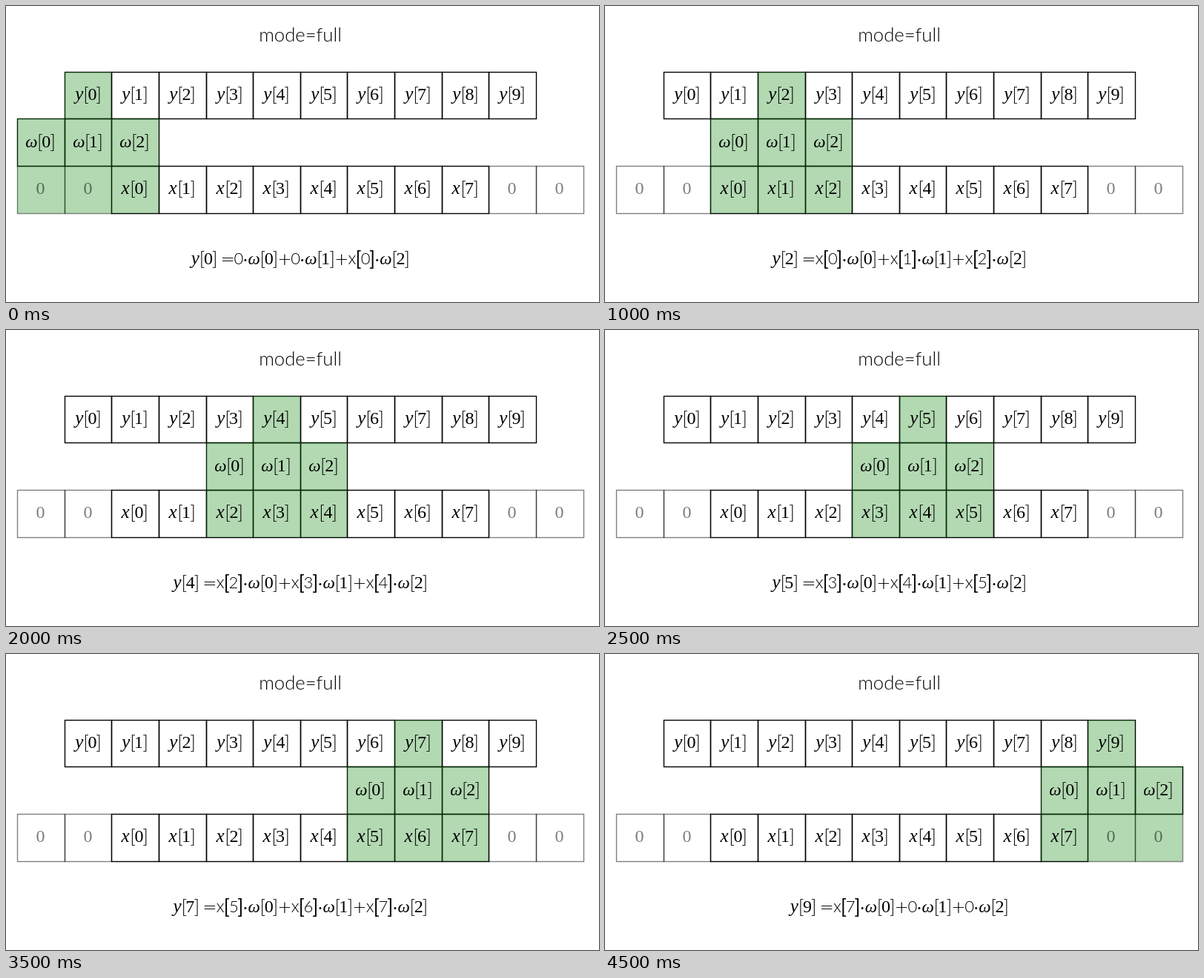
These frames come from a looping animation (800 px wide and 400 px high, 5000 ms). An HTML page with a canvas:

```html
<!DOCTYPE html>
<html lang="en">
<head>
<meta charset="utf-8">
<title>Convolution, mode=full</title>
<style>
  html, body { margin: 0; width: 100%; height: 100%; overflow: hidden; background: #fff; }
  canvas { display: block; width: 800px; height: 400px; }
</style>
</head>
<body>
<canvas id="stage" width="800" height="400"></canvas>
<script>
const ctx = document.getElementById('stage').getContext('2d');
const STEP_MS = 500, STEPS = 10, TAPS = 3, INPUTS = 8;
const ROWS = [89.5, 152.5, 216.5, 280.5];
const BASE = [127, 191, 254];
const TINT = 'rgba(0,128,0,0.3)';
const SERIF = '"Liberation Serif", serif';
const SANS = 'Lato, sans-serif';

// adv: advance, at: place of the ink centre within it, mid: centre on the math axis
const STYLES = {
  y: { font: `italic 25px ${SERIF}`, adv: 13.5 },
  x: { font: `italic 25px ${SERIF}`, adv: 14.3 },
  w: { font: `italic 23px ${SERIF}`, adv: 16.5 },
  digit: { font: `24px ${SERIF}`, adv: 11.5 },
  open: { font: `300 26px ${SANS}`, adv: 6.2, at: 0.67, mid: true },
  close: { font: `300 26px ${SANS}`, adv: 6.2, at: 0.33, mid: true },
  op: { font: '200 23px "DejaVu Sans", sans-serif', adv: 18, mid: true },
  dot: { font: `25px ${SERIF}`, adv: 7.1, mid: true },
  gap: { font: `24px ${SERIF}`, adv: 5 },
  sansX: { font: `300 23px ${SANS}`, adv: 11.2 },
  sansDigit: { font: `300 22px ${SANS}`, adv: 11.3 },
  sansOpen: { font: `26px ${SANS}`, adv: 6.5, at: 0.6, mid: true },
  sansClose: { font: `26px ${SANS}`, adv: 6.5, at: 0.4, mid: true }
};

const edge = i => 15.5 + Math.round(63.64 * i);
const index = i => [['open', '['], ['digit', i], ['close', ']']];
const symbol = (kind, ch, i) => [[kind, ch], ...index(i)];
const omega = i => symbol('w', 'ω', i);
const isInput = i => i >= 0 && i < INPUTS;

function glyph(kind, ch, x, y) {
  const s = STYLES[kind];
  ctx.font = s.font;
  const m = ctx.measureText(ch);
  const inkX = (m.actualBoundingBoxRight - m.actualBoundingBoxLeft) / 2;
  const inkY = (m.actualBoundingBoxDescent - m.actualBoundingBoxAscent) / 2;
  ctx.fillText(ch, x + s.adv * (s.at || 0.5) - inkX, s.mid ? y - 6.25 - inkY : y);
}

function typeset(tokens, x, y) {
  for (const [kind, ch] of tokens) {
    if (kind !== 'gap') glyph(kind, String(ch), x, y);
    x += STYLES[kind].adv;
  }
}

function box(col, row) {
  const x = edge(col), y = ROWS[row];
  return [x, y, edge(col + 1) - x, ROWS[row + 1] - y];
}

function outline(col, row, alpha = 1) {
  ctx.strokeStyle = `rgba(0,0,0,${alpha})`;
  ctx.strokeRect(...box(col, row));
}

// The tint lies over the grid lines, on whole pixels.
function tint(col, row) {
  const [x, y, w, h] = box(col, row);
  ctx.fillStyle = TINT;
  ctx.fillRect(x - 0.5, y - 0.5, w, h);
}

function formula(step) {
  const tokens = [...symbol('y', 'y', step), ['gap', ' '], ['op', '=']];
  for (let j = 0; j < TAPS; j++) {
    const i = step - 2 + j;
    if (j) tokens.push(['op', '+']);
    if (isInput(i)) tokens.push(['sansX', 'x'], ['sansOpen', '['], ['sansDigit', i], ['sansClose', ']']);
    else tokens.push(['sansDigit', 0]);
    tokens.push(['dot', '·'], ...omega(j));
  }
  const width = tokens.reduce((sum, [kind]) => sum + STYLES[kind].adv, 0);
  typeset(tokens, 396 - width / 2, 349);
}

function draw(step) {
  ctx.fillStyle = '#fff';
  ctx.fillRect(0, 0, 800, 400);
  ctx.lineWidth = 1.39;

  const pads = [0, 1, 10, 11];
  for (const col of pads) outline(col, 2, 0.5);
  for (let i = 0; i < INPUTS; i++) outline(i + 2, 2);
  for (let i = 0; i < STEPS; i++) outline(i + 1, 0);
  for (let j = 0; j < TAPS; j++) outline(step + j, 1);

  tint(step + 1, 0);
  for (let j = 0; j < TAPS; j++) {
    tint(step + j, 1);
    tint(step + j, 2);
  }

  ctx.fillStyle = 'rgba(0,0,0,0.5)';
  for (const col of pads) typeset([['digit', 0]], edge(col) + 25.3, BASE[2]);

  ctx.fillStyle = '#000';
  for (let i = 0; i < INPUTS; i++) typeset(symbol('x', 'x', i), edge(i + 2) + 10.8, BASE[2]);
  for (let i = 0; i < STEPS; i++) typeset(symbol('y', 'y', i), edge(i + 1) + 11.5, BASE[0]);
  for (let j = 0; j < TAPS; j++) typeset(omega(j), edge(step + j) + 10.4, BASE[1]);

  ctx.font = `300 25.7px ${SANS}`;
  ctx.textAlign = 'center';
  ctx.fillText('mode=full', 397, 48);
  ctx.textAlign = 'left';
  formula(step);
}

const start = performance.now();
function tick() {
  const t = Math.max(0, performance.now() - start);
  draw(Math.floor(t / STEP_MS) % STEPS);
  requestAnimationFrame(tick);
}
tick();
</script>
</body>
</html>
```
